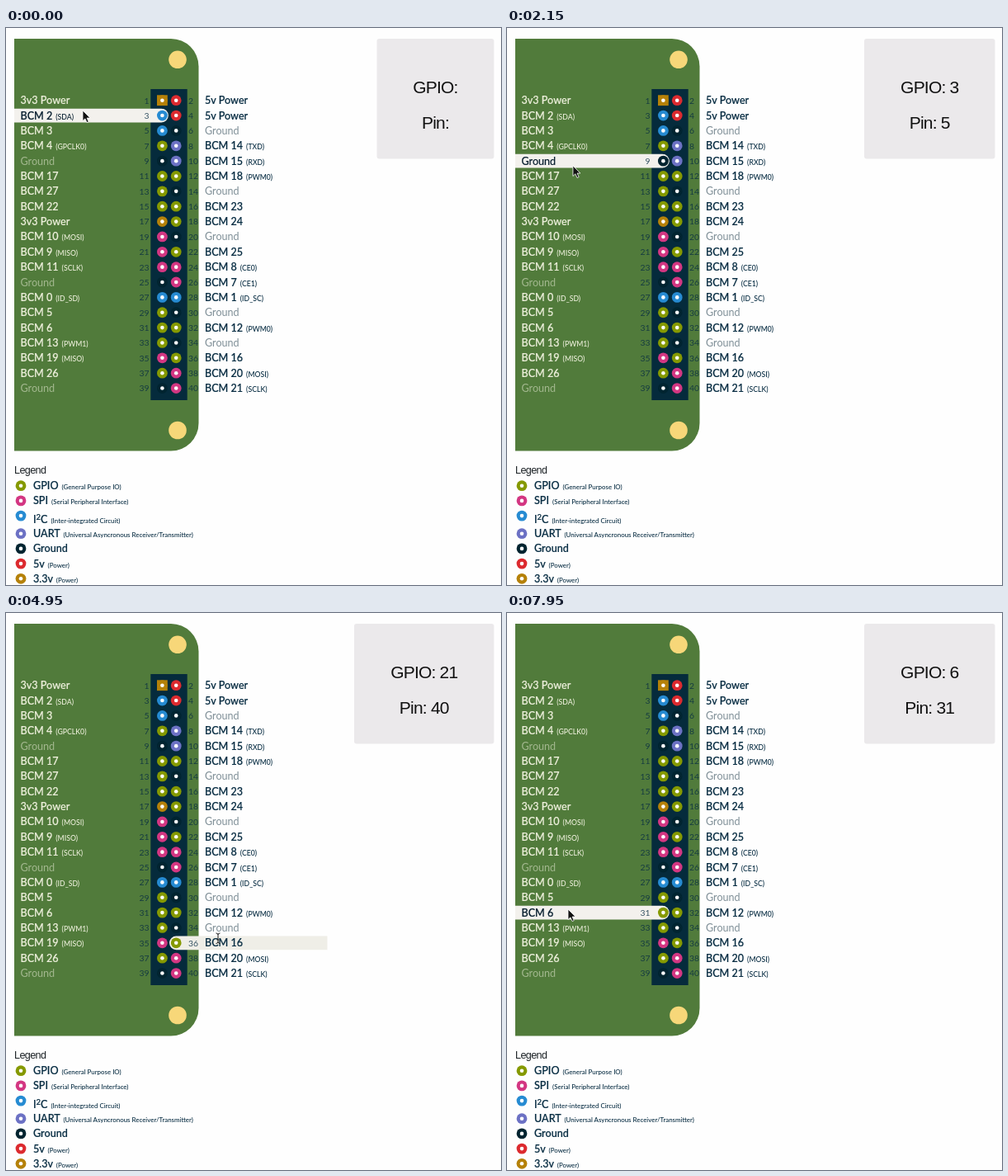
Recreate the animation shown at these times as an HTML page. Size 600 px wide and 675 px high, loop 8000 ms.

```html
<!DOCTYPE html>
<html lang="en">
<head>
<meta charset="utf-8">
<title>Pin header guide</title>
<style>
  html, body { margin: 0; width: 100%; height: 100%; overflow: hidden; background: #fefefe; }
  svg { display: block; width: 600px; height: 675px; }
  text { font-family: Lato, sans-serif; }
  .label { font-size: 12.6px; font-weight: 500; fill: #072c42; stroke: #072c42; stroke-width: .2px; }
  .label.left { fill: #eef0dc; stroke: #eef0dc; }
  .label.ground { fill: #7f8f97; stroke: none; font-weight: 400; }
  .label.left.ground { fill: #a3b88f; }
  .label.left.on { fill: #061d2e; stroke: #061d2e; }
  .sub { font-size: 8.7px; stroke: none; }
  .legend .sub { font-size: 7.9px; }
  .number { font-size: 10.4px; fill: #072c42; opacity: .8; }
  .title { font: 12.6px "Liberation Sans", sans-serif; letter-spacing: -.6px; fill: #1c2226; }
  .panel text { font: 21px "Liberation Sans", sans-serif; letter-spacing: -.8px; text-anchor: middle; fill: #111; }
</style>
</head>
<body>
<svg viewBox="0 0 600 675">
  <path d="M10 13H200a33.5 33.5 0 0 1 33.5 33.5V479a33.5 33.5 0 0 1-33.5 33.5H10z" fill="#517b3b"/>
  <g fill="#f7d779"><circle cx="208" cy="38.3" r="10.8"/><circle cx="208" cy="487.5" r="10.8"/></g>
  <path d="M175.3 74H219.7V451H175.3z" fill="#052b3c"/>
  <path id="highlight"/>
  <path id="selection" d="M34 98H46V114H34z" fill="#8fb3d3"/>
  <g id="pins"></g>
  <g id="legend" class="legend"></g>
  <g class="panel">
    <rect id="box" y="13" height="145.5" rx="3" fill="#ebe9eb"/>
    <text id="gpio" y="79"></text>
    <text id="pin" y="121.7"></text>
  </g>
  <g id="cursor">
    <path id="arrow" d="M0 0V12.6L2.9 9.9L5.1 14.6L7.2 13.6L5.1 9.1H9z" fill="#111" stroke="#fff" stroke-width=".8"/>
    <path id="beam" d="M-2.5-6Q0-6 0-4Q0-6 2.5-6M0-4V4.5M-2.5 6.5Q0 6.5 0 4.5Q0 6.5 2.5 6.5M-1.5 2H1.5" fill="none" stroke="#222"/>
  </g>
</svg>
<script>
const $ = id => document.getElementById(id);
const labels = [
  ('3v3 Power,BCM 2|SDA,BCM 3,BCM 4|GPCLK0,Ground,BCM 17,BCM 27,BCM 22,3v3 Power,BCM 10|MOSI,' +
   'BCM 9|MISO,BCM 11|SCLK,Ground,BCM 0|ID_SD,BCM 5,BCM 6,BCM 13|PWM1,BCM 19|MISO,BCM 26,Ground').split(','),
  ('5v Power,5v Power,Ground,BCM 14|TXD,BCM 15|RXD,BCM 18|PWM0,Ground,BCM 23,BCM 24,Ground,' +
   'BCM 25,BCM 8|CE0,BCM 7|CE1,BCM 1|ID_SC,Ground,BCM 12|PWM0,Ground,BCM 16,BCM 20|MOSI,BCM 21|SCLK').split(',')
];
// the first rule that fits a label gives its pin colour
const colorRules = [
  [/Ground/, '#002430'],
  [/5v/, '#dc2a2f'],
  [/3v3|3\.3v/, '#b58109'],
  [/SDA|ID_|BCM 3$|Inter-/, '#268bd2'],
  [/MOSI|MISO|SCLK|CE\d|SPI/, '#d33682'],
  [/[TR]XD|UART/, '#6c71c4'],
  [/./, '#859900']
];
const colorOf = text => colorRules.find(([rule]) => rule.test(text))[1];

const PITCH = 18.36;
const rowY = i => 87.7 + PITCH * i;
const clamp = u => Math.min(1, Math.max(0, u));
const smooth = u => u * u * (3 - 2 * u);

function dot(x, y, text, square) {
  const fill = colorOf(text);
  const back = square ? `<rect x="${x - 6.4}" y="${y - 6.4}" width="12.8" height="12.8" fill="${fill}"/>` : '';
  return `${back}<circle cx="${x}" cy="${y}" r="6.4" fill="${fill}"/><circle cx="${x}" cy="${y}" r="2.3" fill="#fff"/>`;
}

function label(x, y, text, cls = '') {
  const [name, sub] = text.split('|');
  const note = sub ? ` <tspan class="sub" dx=".8">(${sub})</tspan>` : '';
  return `<text class="label ${cls}" x="${x}" y="${y + 4.5}">${name}${note}</text>`;
}

function pinMarkup(text, i, side) {
  const y = rowY(i);
  const cls = (side ? '' : 'left') + (text === 'Ground' ? ' ground' : '');
  return label(side ? 241 : 17.5, y, text, cls) +
    `<text class="number" x="${side ? 221 : 173.5}" y="${y + 3.9}" text-anchor="${side ? 'start' : 'end'}">${2 * i + 1 + side}</text>` +
    dot(side ? 206.2 : 189.4, y, text, !side && !i);
}
$('pins').innerHTML = labels.map((column, side) =>
  column.map((text, i) => pinMarkup(text, i, side)).join('')).join('');
const leftTexts = [...document.querySelectorAll('.left')];

const legend = [
  'GPIO|General Purpose IO',
  'SPI|Serial Peripheral Interface',
  'I<tspan font-size="9.5" dy="-4">2</tspan><tspan dy="4">C</tspan>|Inter-integrated Circuit',
  'UART|Universal Asyncronous Receiver/Transmitter',
  'Ground', '5v|Power', '3.3v|Power'
];
$('legend').innerHTML = '<text class="title" x="10" y="539.7">Legend</text>' +
  legend.map((text, i) => {
    const y = 554.7 + 18.2 * i + (i > 2 ? 3.4 : 0); // the superscript line is taller
    return dot(18, y, text) + label(33, i === 2 ? y + 4 : y, text);
  }).join('');

// the pointer rests around each stop [time, x, y] and clicks there
const REST = 220;
const stops = [
  [0, 93, 100], [600, 39, 103], [1800, 39, 120], [2750, 292, 410], [3830, 284, 432],
  [5050, 257, 394], [5600, 257, 360], [6150, 96, 352], [6650, 64, 322], [7200, 66, 341], [7830, 74, 359]
];

function pointerAt(t) {
  const k = stops.findLastIndex(s => s[0] <= t);
  const [t0, x0, y0] = stops[k], [t1, x1, y1] = stops[k + 1] || stops[k];
  const e = smooth(clamp((t - t0 - REST) / Math.max(1, t1 - t0 - 2 * REST)));
  return [x0 + (x1 - x0) * e, y0 + (y1 - y0) * e];
}

function hover(x, y) {
  const i = Math.round((y + .7 - rowY(0)) / PITCH);
  const active = i >= 0 && i < 20 && Math.abs(y + .7 - rowY(i)) < 7.8 && x > 10 && x < 390;
  return { i, active, side: x < 198 ? 0 : 1 };
}

const clicks = stops.slice(1)
  .map(([time, x, y]) => ({ time, ...hover(x, y) }))
  .filter(c => c.active)
  .map(({ time, i, side }) => ({ time, bcm: labels[side][i].match(/\d+/)[0], pin: 2 * i + 1 + side }));

function renderPanel(t) {
  const { bcm, pin } = clicks.findLast(c => c.time <= t) || { bcm: '', pin: '' };
  const width = 142 + (bcm && 5.5 + 11 * bcm.length);
  $('box').setAttribute('x', 591.5 - width);
  $('box').setAttribute('width', width);
  $('gpio').textContent = `GPIO: ${bcm}`.trim();
  $('pin').textContent = `Pin: ${pin}`.trim();
  for (const id of ['gpio', 'pin']) $(id).setAttribute('x', 591.5 - width / 2);
}

function render(t) {
  const [x, y] = pointerAt(t);
  const { i, active, side } = hover(x, y);
  const top = rowY(i) - 8.4;
  $('highlight').setAttribute('d', !active ? '' : side
    ? `M389.5 ${top}H206.4a8.4 8.4 0 0 0 0 16.8H389.5z`
    : `M10 ${top}H188.4a8.4 8.4 0 0 1 0 16.8H10z`);
  $('highlight').setAttribute('fill', side ? '#efeee7' : '#f3f1ed');
  leftTexts.forEach((el, n) => el.classList.toggle('on', active && !side && n === i));

  const textX = side ? 240 : 17;
  const overText = active && x > textX && x < textX + 46;
  $('arrow').style.display = overText ? 'none' : '';
  $('beam').style.display = overText ? '' : 'none';
  $('cursor').setAttribute('transform', `translate(${x} ${y})`);
  $('selection').style.display = t >= clicks[0].time && t < clicks[1].time ? '' : 'none';
  renderPanel(t);
}

const start = performance.now();
function tick() {
  const t = Math.max(0, performance.now() - start) % 8000;
  render(Math.floor(t / 50) * 50);
  requestAnimationFrame(tick);
}
tick();
</script>
</body>
</html>
```
